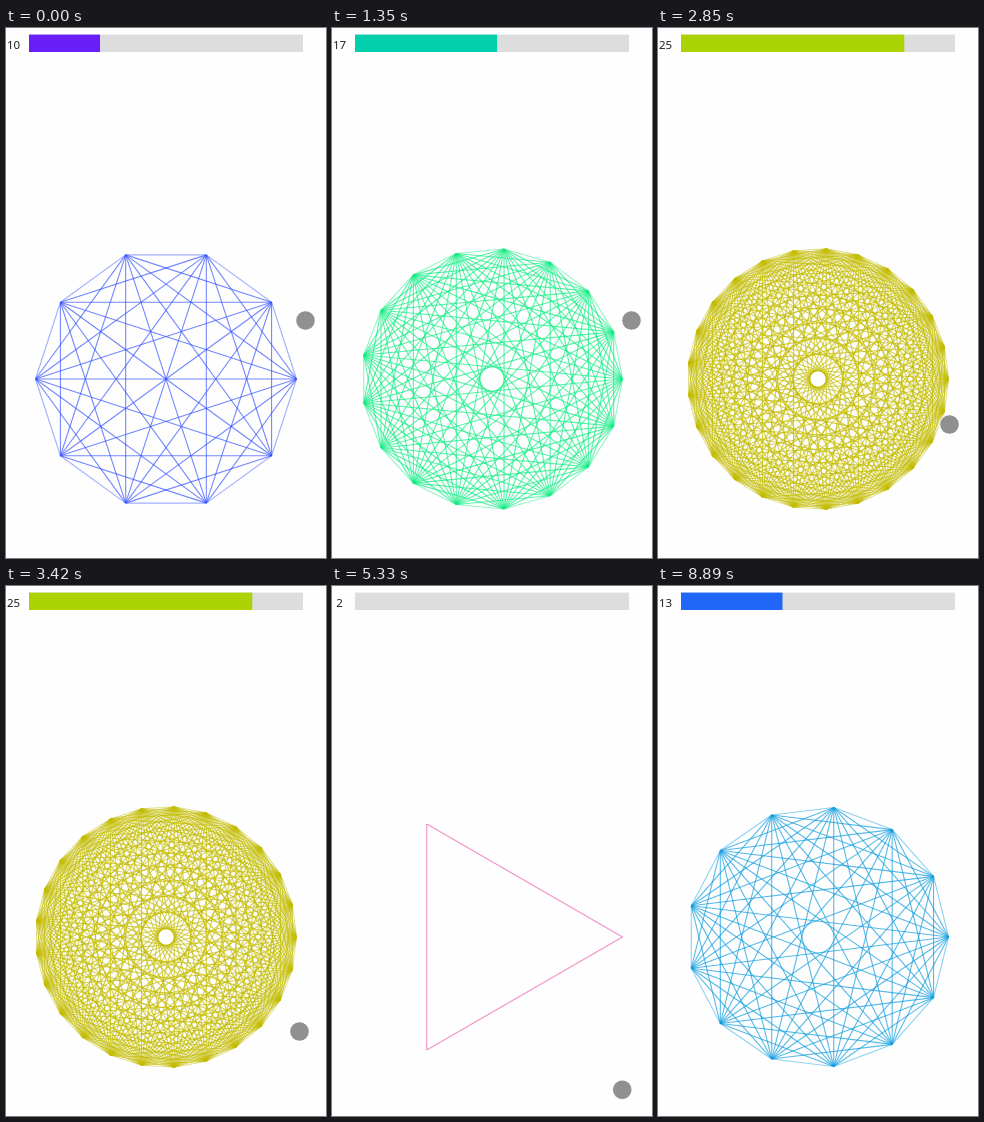
Write an HTML page with a canvas that moves like this. It is 320x530 px and loops after 9640 ms.

```html
<!DOCTYPE html>
<html lang="en">
<head>
<meta charset="utf-8">
<title>Polygon slider</title>
<style>
  html, body { margin: 0; width: 100%; height: 100%; overflow: hidden; background: #fefefe; }
  canvas { display: block; }
</style>
</head>
<body>
<canvas id="stage" width="320" height="530"></canvas>
<script>
const ctx = document.getElementById('stage').getContext('2d');
const LOOP = 9640, TICKS = 70, POINTER_END = 64, TAU = Math.PI * 2;
const CX = 160, CY = 351, RADIUS = 130.5;
const MIN = 3, MAX = 30;
const BAR = { x: 23, y: 6.6, w: 274, h: 17.4 };

// Key points: tick, then the values reached at that tick
const countKeys = [
  [0, 10], [5, 14], [13, 19], [18, 24], [20, 25], [27, 25], [28, 0],
  [34, 0], [42, 4], [50, 4], [58, 13], [TICKS, 13],
];
const pointerKeys = [
  [0, 299.5, 292.5], [18, 299.5, 292.5], [21, 291.5, 396.5], [29, 295.5, 494.5],
  [34, 299.5, 508.5], [44, 281, 499], [50, 36.5, 15.5], [58, 132, 33],
  [61, 132, 33], [POINTER_END, 310, 493],
];

function sample(keys, tick) {
  const next = keys.findIndex(key => key[0] > tick);
  const [t0, ...from] = keys[next - 1], [t1, ...to] = keys[next];
  const k = (tick - t0) / (t1 - t0);
  return from.map((v, i) => v + (to[i] - v) * k);
}

function sinebow(t) {
  const channel = shift => Math.round(255 * Math.sin(Math.PI * (shift - t)) ** 2);
  return `rgb(${channel(1 / 2)},${channel(5 / 6)},${channel(7 / 6)})`;
}

function drawSlider(count) {
  const { x, y, w, h } = BAR;
  ctx.fillStyle = '#ddd';
  ctx.fillRect(x, y, w, h);
  ctx.fillStyle = sinebow(1.07 - 0.035 * count);
  ctx.fillRect(x, y, w * (Math.max(MIN, count) - MIN) / (MAX - MIN), h);
  ctx.fillStyle = '#222';
  ctx.font = '11.5px "Noto Sans", sans-serif';
  ctx.textAlign = 'center';
  ctx.fillText(count, 7.5, 21);
}

function drawPolygon(count) {
  const n = Math.max(MIN, count);
  const points = Array.from({ length: n }, (_, i) => [
    CX + RADIUS * Math.cos(i / n * TAU),
    CY + RADIUS * Math.sin(i / n * TAU),
  ]);
  ctx.strokeStyle = sinebow(0.97 * (1 - count / MAX));
  ctx.lineWidth = 1.1;
  for (let i = 0; i < n; i++) {
    for (let j = i + 1; j < n; j++) {
      const isEdge = j - i === 1 || j - i === n - 1;
      ctx.globalAlpha = isEdge ? 0.45 : 0.68;
      ctx.beginPath();
      ctx.moveTo(...points[i]);
      ctx.lineTo(...points[j]);
      ctx.stroke();
    }
  }
  ctx.globalAlpha = 1;
}

function drawPointer(x, y) {
  ctx.beginPath();
  ctx.arc(x, y, 9.5, 0, TAU);
  ctx.fillStyle = 'rgba(0,0,0,.43)';
  ctx.fill();
  ctx.beginPath();
  ctx.arc(x, y, 10, 0, TAU);
  ctx.strokeStyle = 'rgba(255,255,255,.5)';
  ctx.lineWidth = 1.5;
  ctx.stroke();
}

function render() {
  const progress = performance.now() % LOOP / LOOP;
  const tick = Math.min(TICKS - 1, Math.floor(progress * TICKS + 0.31));
  const count = Math.floor(sample(countKeys, tick)[0] + 0.25);
  ctx.fillStyle = '#fefefe';
  ctx.fillRect(0, 0, 320, 530);
  drawSlider(count);
  drawPolygon(count);
  if (tick < POINTER_END) drawPointer(...sample(pointerKeys, tick));
  requestAnimationFrame(render);
}
render();
</script>
</body>
</html>
```
